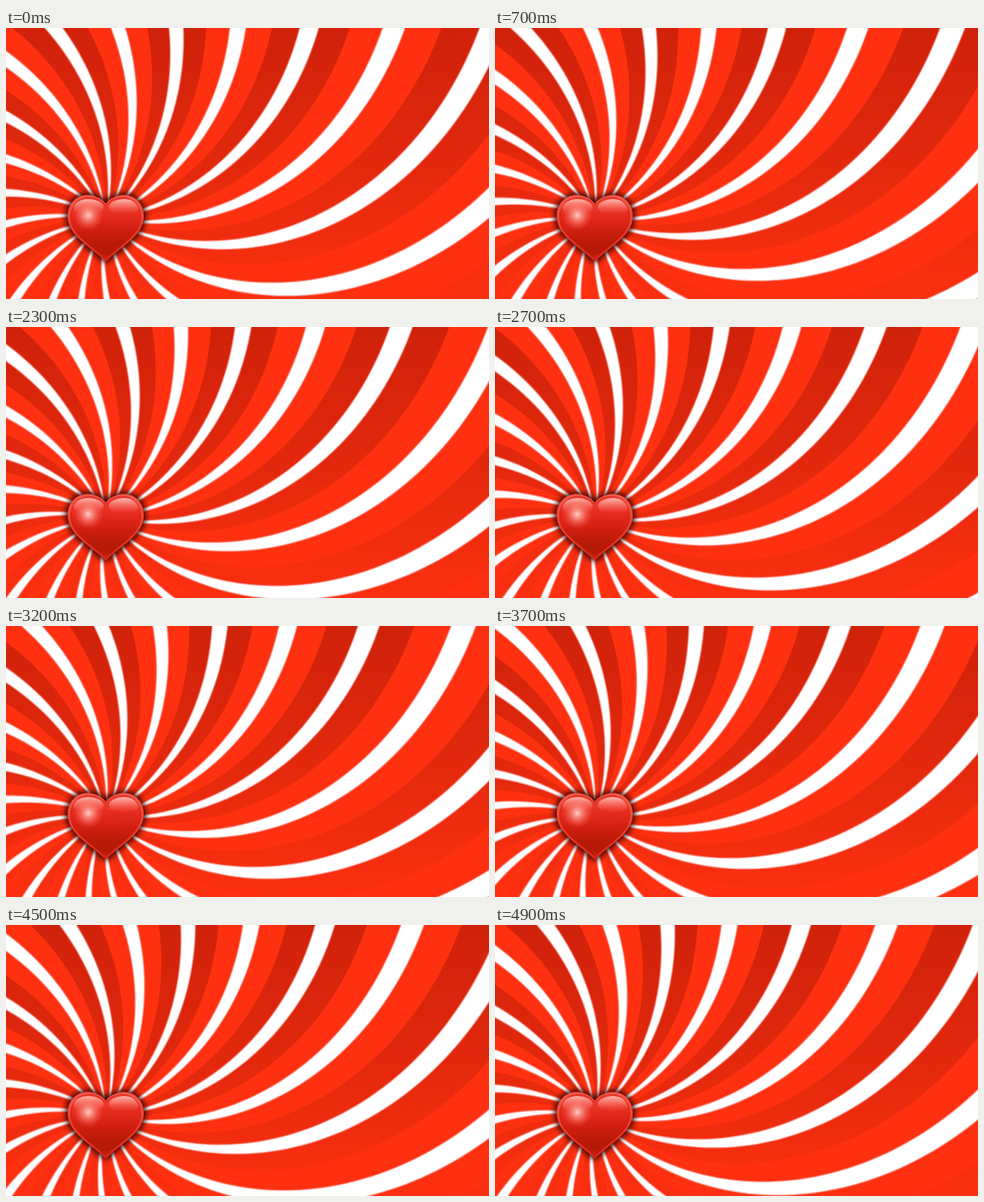
An HTML page with a canvas that plays this animation: 540 px wide and 304 px high, repeating every 5000 ms.

```html
<!DOCTYPE html>
<html lang="en">
<head>
<meta charset="utf-8">
<title>Heart with turning rays</title>
<style>
  html, body { margin: 0; width: 100%; height: 100%; overflow: hidden; background: #ff3010; }
  canvas { display: block; }
</style>
</head>
<body>
<canvas id="stage" width="540" height="304"></canvas>
<script>
const ctx = document.getElementById('stage').getContext('2d');
const W = 540, H = 304;
const CX = 112, CY = 214;
const RAYS = 20, PITCH = 360 / RAYS;
const TWIST = 0.112;          // degrees of bend per pixel of radius
const START = 9.6;            // bearing of the first ray at the centre
const LOOP = 5000, STEP = 100;

function addStops(g, stops) {
  stops.forEach(([at, color]) => g.addColorStop(at, color));
  return g;
}
const fade = (y0, y1, stops) => addStops(ctx.createLinearGradient(0, y0, 0, y1), stops);
const glow = (x, y, r, stops) => addStops(ctx.createRadialGradient(x, y, 0, x, y, r), stops);

const shade = fade(0, H, [
  [0, '#d0220a'], [0.45, '#e0270c'], [0.75, '#f02c0e'], [1, '#fc2f10']
]);

// Spiral band around a bearing, in degrees clockwise from up
function band(mid, half) {
  const path = new Path2D();
  const point = (r, bearing) => {
    const a = (bearing - TWIST * r) * Math.PI / 180;
    path.lineTo(CX + r * Math.sin(a), CY - r * Math.cos(a));
  };
  for (let r = 0; r <= 600; r += 8) point(r, mid - half);
  for (let r = 600; r >= 0; r -= 8) point(r, mid + half);
  path.closePath();
  return path;
}

// Dark and bright bands alternate, each with a white ray along its middle
function drawRays(turn) {
  ctx.fillStyle = '#ff3010';
  ctx.fillRect(0, 0, W, H);
  ctx.strokeStyle = 'rgba(245, 150, 140, 0.6)';
  ctx.lineWidth = 1.6;
  for (let k = 0; k < RAYS; k++) {
    const mid = START + k * PITCH - turn;
    if (k % 2 === 0) {
      ctx.fillStyle = shade;
      ctx.fill(band(mid, PITCH / 2));
    }
    const white = band(mid, 2.2);
    ctx.fillStyle = '#fff';
    ctx.fill(white);
    ctx.stroke(white);
  }
}

const outer = new Path2D(
  'M111.5 197C106 190 98 187.5 91 187.5C78 187.5 69 198 69 211' +
  'C69 233 93 244 111.5 262C130 244 154 233 154 211' +
  'C154 198 145 187.5 132 187.5C125 187.5 117 190 111.5 197Z');
const inner = new Path2D();
inner.addPath(outer, new DOMMatrix().translate(111.5, 222).scale(0.92).translate(-111.5, -222));

const rim = fade(187, 262, [[0, '#f8584a'], [0.5, '#f03c2c'], [1, '#d8281a']]);
const body = fade(190, 259, [
  [0, '#f4463a'], [0.3, '#e42a1c'], [0.5, '#d42012'],
  [0.75, '#b81a06'], [0.9, '#b41a06'], [1, '#cc2414']
]);
const gloss = fade(190, 209, [
  [0, 'rgba(255,225,220,.9)'], [0.5, 'rgba(255,160,150,.5)'], [1, 'rgba(255,110,100,0)']
]);
const spot = glow(92, 210, 17, [
  [0, 'rgba(255,215,210,.95)'], [0.4, 'rgba(255,150,140,.65)'], [1, 'rgba(255,90,80,0)']
]);

function drawHeart() {
  ctx.save();
  ctx.shadowColor = 'rgb(40, 0, 0)';
  ctx.shadowBlur = 9;
  ctx.fillStyle = rim;
  ctx.fill(outer);
  ctx.fill(outer);
  ctx.restore();

  ctx.save();
  ctx.fillStyle = body;
  ctx.fill(inner);
  ctx.clip(inner);
  ctx.fillStyle = gloss;
  for (const x of [92, 132]) {
    ctx.beginPath();
    ctx.ellipse(x, 201, 17, 9, 0, 0, 7);
    ctx.fill();
  }
  ctx.fillStyle = spot;
  ctx.fillRect(70, 190, 45, 40);
  ctx.restore();

  ctx.lineWidth = 1;
  ctx.strokeStyle = 'rgba(190, 24, 14, 0.6)';
  ctx.stroke(inner);
}

function frame() {
  const time = Math.floor(performance.now() % LOOP / STEP) * STEP;
  drawRays(time / LOOP * 2 * PITCH);
  drawHeart();
  requestAnimationFrame(frame);
}
frame();
</script>
</body>
</html>
```
